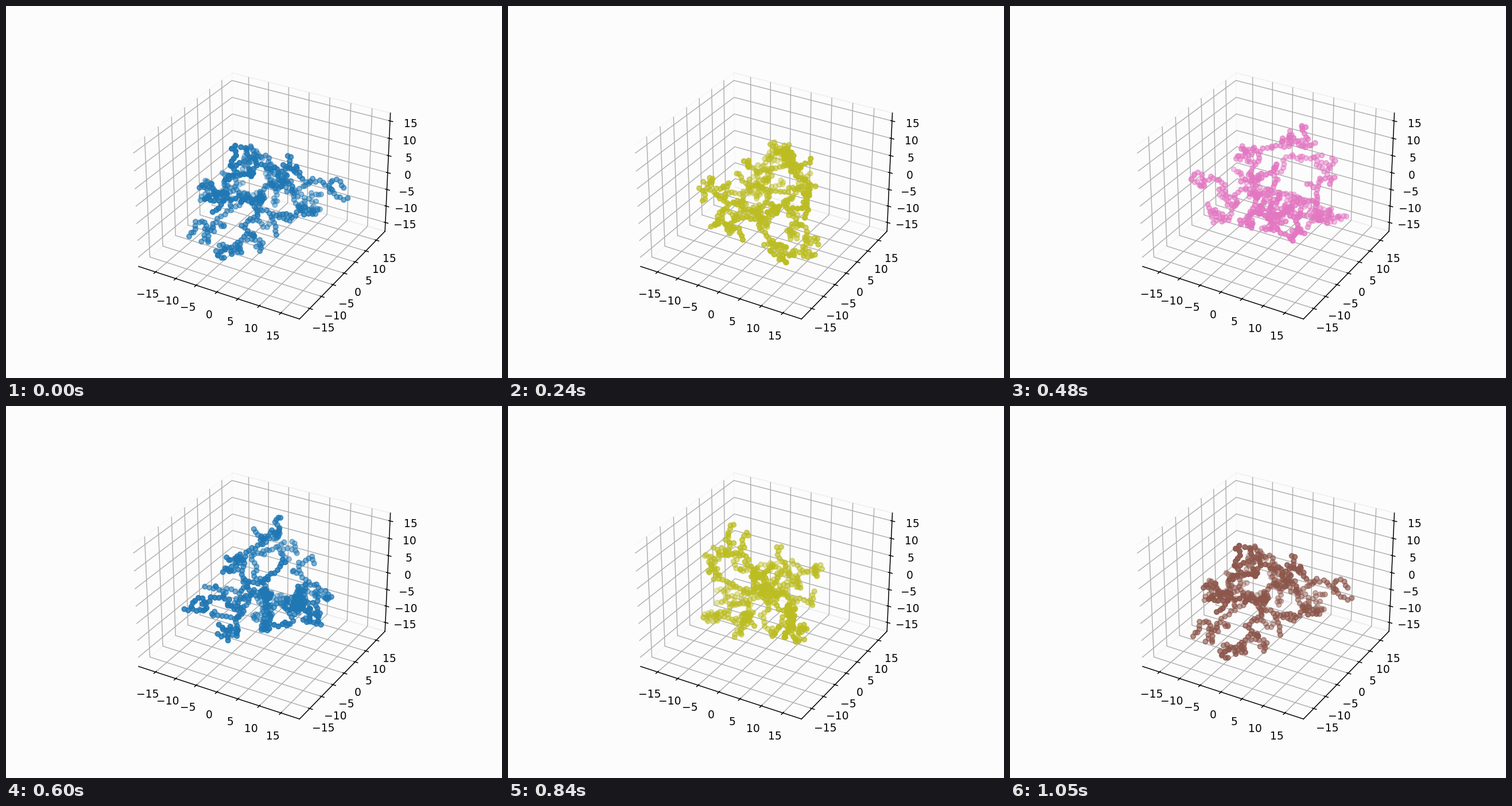
A matplotlib script that plays this animation: 864x648 px, repeating every 1.08 s.

```python
import numpy as np
import matplotlib.pyplot as plt
from matplotlib.animation import ArtistAnimation

FRAMES, INTERVAL = 36, 30
COUNT, FIRST_GOALS = 500, 100
BACKGROUND = "#fcfcfc"

# Outermost ends of the cluster: angle (deg), radius, height
ENDS = [
    (30, 17, 0), (55, 11.5, -9), (231, 16.8, -10), (264, 13.8, -13),
    (252, 14.8, 5), (255, 7.5, 15), (180, 14.4, -2), (135, 13.5, 1),
    (160, 12, -7), (-8, 13, -1), (-64, 6.4, -14), (10, 7, 9),
]


def unit(v):
    return v / np.linalg.norm(v)


def from_polar(angle, radius, height):
    a = np.radians(angle)
    return np.array([radius * np.cos(a), radius * np.sin(a), height])


def grow_cluster(rng):
    """Grow a branching tree of unit steps that fills the space between the ends."""
    ends = [from_polar(*end) for end in ENDS]
    points = [np.zeros(3)]

    def random_goal():
        i, j = rng.choice(len(ends), 2, replace=False)
        mix = rng.beta(0.5, 0.6)
        return 0.92 * (mix * ends[i] + (1 - mix) * ends[j]) + rng.normal(0, 1.3, 3)

    def grow_to(goal):
        pos = min(points, key=lambda p: np.linalg.norm(p - goal))
        while np.linalg.norm(goal - pos) > 1:
            pos = pos + unit(unit(goal - pos) + rng.normal(0, 0.4, 3))
            points.append(pos)

    goals = ends + [random_goal() for _ in range(FIRST_GOALS)]
    for goal in sorted(goals, key=np.linalg.norm):
        grow_to(goal)
    while len(points) < COUNT:
        grow_to(random_goal())
    return np.array(points)


x, y, z = grow_cluster(np.random.default_rng(7)).T

fig = plt.figure(figsize=(6.4, 4.8), dpi=135, facecolor=BACKGROUND)
ax = fig.add_subplot(projection="3d", facecolor=BACKGROUND)

frames = []
for k in range(FRAMES):
    turn = 2 * np.pi * k / (FRAMES - 1)
    c, s = np.cos(turn), np.sin(turn)
    frames.append([ax.scatter(c * x - s * y, s * x + c * y, z, color=f"C{k % 10}")])

ax.set(xlim=(-19.25, 19.25), ylim=(-19.25, 19.25), zlim=(-17.7, 17.25))
for axis in (ax.xaxis, ax.yaxis, ax.zaxis):
    axis.set_ticks(range(-15, 16, 5))
    axis.pane.set_fill(False)

anim = ArtistAnimation(fig, frames, interval=INTERVAL, repeat=True, repeat_delay=0)
plt.show()
```
